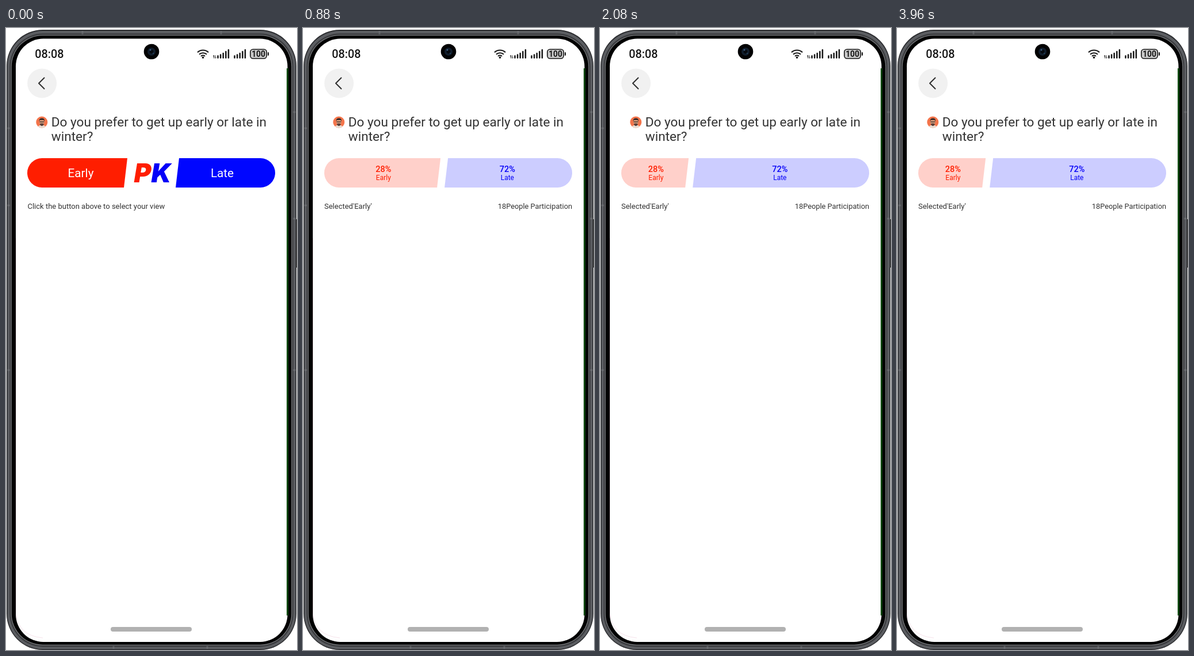
These frames come from a looping animation (506x1080 px, 4000 ms). An HTML page:

```html
<!DOCTYPE html>
<html lang="en">
<head>
<meta charset="utf-8">
<title>Early or late poll</title>
<style>
  html, body { margin: 0; width: 100%; height: 100%; overflow: hidden; background: #fff; }
  svg { display: block; width: 100%; height: 100%; }
  text { font-family: Roboto, sans-serif; fill: #333; }
  .mid { text-anchor: middle; }
  .red { fill: #ff1e00; }
  .blue { fill: #0500f8; }
  .choice { font-size: 20.7px; fill: #fff; }
  .note { font-size: 13px; }
  .pct { font-size: 14.5px; font-weight: 500; }
  .tag { font-size: 12px; }
  .pk { font: italic 900 45.5px Inter, sans-serif; }
</style>
</head>
<body>
<svg viewBox="0 0 506 1080" preserveAspectRatio="none">
  <g id="phone">
    <path d="M504.8 332V416" stroke="#222" stroke-width="2"/>
    <rect x="1" y="3" width="504" height="1077" rx="63" fill="#2c2d30"/>
    <rect x="2.5" y="5" width="501" height="1073.5" rx="61.5" fill="#5b5d61"/>
    <rect x="6.5" y="9.5" width="493" height="1065" rx="57.5" fill="#3a3b3e"/>
    <rect x="8.5" y="12" width="489" height="1060" rx="55.5" fill="#77797c"/>
    <path d="M2 174H7M2 308H7M2 594H7M499 146H504M499 331H504M499 594H504M133 5V11M374 5V11M187 1073V1078M350 1073V1078"
      stroke="#77797d" stroke-width="3" opacity=".5"/>
    <rect x="9.8" y="13.3" width="486.4" height="1057.4" rx="54" fill="#000"/>
    <rect x="17" y="18.5" width="472.5" height="1047.5" rx="48" fill="#fff"/>
    <rect x="488" y="70" width="3" height="950" fill="#06470a"/>
    <path d="M17.5 365V1015Q20 1055 64 1059" fill="none" stroke="#e9b9cd" stroke-width=".7" opacity=".6"/>
  </g>

  <g id="status">
    <text x="50.2" y="52" font-size="19.8" font-weight="500" style="fill:#161616">08:08</text>
    <circle cx="253" cy="41" r="13.3" fill="#020203"/>
    <circle cx="253" cy="41" r="7" fill="#101c2b"/>
    <circle cx="253" cy="41" r="3.3" fill="#05080d"/>
    <circle cx="251" cy="38" r="1.5" fill="#3f6084"/>
    <circle cx="256" cy="44" r="1" fill="#294c6d"/>
    <path d="M333 42.2A14 14 0 0 1 352 42.2M336 45.8A9.5 9.5 0 0 1 349 45.8M339 49A5.2 5.2 0 0 1 346 49"
      fill="none" stroke="#161616" stroke-width="2.2"/>
    <circle cx="342.5" cy="51.3" r="1.8" fill="#161616"/>
    <path d="M361.5 52.5V47.5L360 49M364 47.5V52.5L365.5 51" fill="none" stroke="#161616" stroke-width="1"/>
    <path id="bars" stroke="#161616" stroke-width="2.5" stroke-linecap="round"/>
    <rect x="424.8" y="37" width="28.4" height="16" rx="4.8" fill="#c9c9c9" stroke="#161616" stroke-width="1.6"/>
    <path d="M456 43V47" stroke="#161616" stroke-width="2" stroke-linecap="round"/>
    <text class="mid" x="439" y="49.8" font-size="13.8" font-weight="700" style="fill:#161616">100</text>
  </g>

  <circle cx="62.6" cy="96" r="25.5" fill="#f1f1f1"/>
  <path d="M66.5 86.5L57 96L66.5 105.5" fill="none" stroke="#303030" stroke-width="2" stroke-linecap="round" stroke-linejoin="round"/>

  <g id="avatar">
    <circle cx="62.3" cy="163.5" r="10" fill="#f4744a"/>
    <path d="M55.5 170.5Q62 166.5 69 170.5Q62.3 176.3 55.5 170.5Z" fill="#e9dfd5"/>
    <ellipse cx="62.3" cy="163.5" rx="4.2" ry="5" fill="#e3a783"/>
    <path d="M57.5 162Q57.3 156.5 62.5 156.5Q67.5 156.5 67 162L65.5 160H59Z" fill="#40302d"/>
    <path d="M58.3 163H66.3" stroke="#40302d" stroke-width="1.5"/>
    <path d="M58.8 166Q62.3 165 65.8 166Q65.3 170 62.3 170.2Q59.4 170 58.8 166Z" fill="#59403a"/>
  </g>

  <g font-size="22.6">
    <text x="78.7" y="171">Do you prefer to get up early or late in</text>
    <text x="78.7" y="196">winter?</text>
  </g>

  <path id="left"/>
  <path id="right"/>

  <g id="ask">
    <text class="choice mid" x="130" y="259">Early</text>
    <text class="choice mid" x="376" y="259">Late</text>
    <text class="pk red" x="222.5" y="268">P</text>
    <text class="pk blue" x="252.5" y="268">K</text>
    <text class="note" x="37.5" y="314">Click the button above to select your view</text>
  </g>

  <g id="result">
    <g id="early" class="mid">
      <text class="pct red" y="250">28%</text>
      <text class="tag red" y="264">Early</text>
    </g>
    <g id="late" class="mid">
      <text class="pct blue" y="250">72%</text>
      <text class="tag blue" y="264">Late</text>
    </g>
    <text class="note" x="37" y="314">Selected'Early'</text>
    <text class="note" x="468" y="314" text-anchor="end" style="font-size:12.8px">18People Participation</text>
  </g>

  <rect x="182" y="1040" width="141" height="8" rx="4" fill="#b1b1b1"/>
</svg>
<script>
const LOOP = 4000, VOTE = 743, SLIDE = 613;
const X0 = 37, X1 = 468, TOP = 226, BOTTOM = 277, R = 25.5, SLANT = 6;
const $ = id => document.getElementById(id);
const set = (id, attrs) => {
  for (const key in attrs) $(id).setAttribute(key, attrs[key]);
};

const bars = x => [48.5, 46.5, 44, 41, 38]
  .map((y, i) => `M${x + i * 4.6} ${y}V51.7`).join("");
set("bars", { d: bars(368.5) + bars(397.5) });

// CSS-style ease-in-out: cubic-bezier(.42, 0, .58, 1)
function ease(p) {
  if (p <= 0) return 0;
  if (p >= 1) return 1;
  let lo = 0, hi = 1;
  for (let i = 0; i < 24; i++) {
    const u = (lo + hi) / 2, v = 1 - u;
    const x = 3 * v * v * u * 0.42 + 3 * v * u * u * 0.58 + u * u * u;
    if (x < p) lo = u; else hi = u;
  }
  return lo * lo * (3 - 2 * lo);
}

const leftPill = x =>
  `M${X0 + R} ${TOP}H${x}L${x - SLANT} ${BOTTOM}H${X0 + R}A${R} ${R} 0 0 1 ${X0 + R} ${TOP}Z`;
const rightPill = x =>
  `M${x} ${TOP}H${X1 - R}A${R} ${R} 0 0 1 ${X1 - R} ${BOTTOM}H${x - SLANT}Z`;

function draw(t) {
  const voted = t >= VOTE;
  $("ask").style.display = voted ? "none" : "";
  $("result").style.display = voted ? "" : "none";
  if (!voted) {
    set("left", { d: leftPill(211), fill: "#ff1e00" });
    set("right", { d: rightPill(301), fill: "#0006ff" });
    return;
  }
  const share = 0.5 - 0.22 * ease((t - VOTE) / SLIDE);
  const split = X0 + (X1 - X0) * share;
  set("left", { d: leftPill(split - 3.5), fill: "#ffd0ca" });
  set("right", { d: rightPill(split + 9.5), fill: "#cccdff" });
  set("early", { transform: `translate(${(X0 + split) / 2} 0)` });
  set("late", { transform: `translate(${(X1 + split) / 2} 0)` });
}

const start = performance.now();
function tick() {
  draw((performance.now() - start) % LOOP);
  requestAnimationFrame(tick);
}
tick();
</script>
</body>
</html>
```
